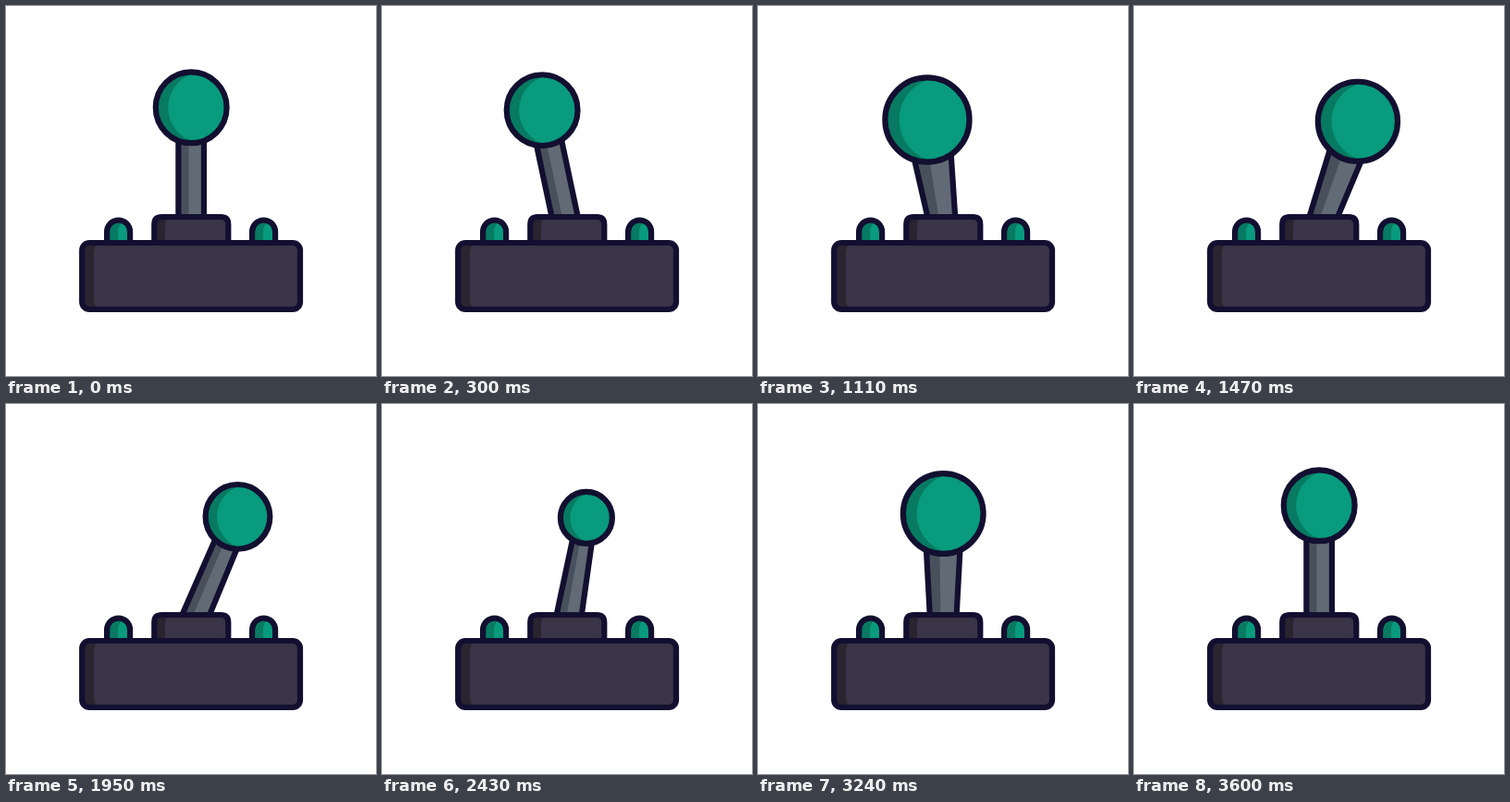
Recreate the animation shown at these times as an HTML page. Size 400x400 px, loop 5.63 s.

```html
<!DOCTYPE html>
<html lang="en">
<head>
<meta charset="utf-8">
<title>Joystick</title>
<style>
  html, body { margin: 0; width: 100%; height: 100%; overflow: hidden; background: #fff; }
  svg { display: block; width: 100%; height: 100%; }
  .line { fill: none; stroke: #120f30; stroke-width: 6.2; stroke-linejoin: round; stroke-linecap: round; }
  .green { fill: #089b7d; }
  .pine { fill: #087a62; }
  .plum { fill: #3a3447; }
  .shade { fill: #29242f; }
  .steel { fill: #626b75; }
  .slate { fill: #48515b; }
</style>
</head>
<body>
<svg viewBox="0 0 400 400">
  <defs>
    <clipPath id="round"><circle id="mask" r="38.5"/></clipPath>
    <g id="button">
      <path class="pine" d="M-12.5 256V244a12.5 12.5 0 0 1 25 0V256Z"/>
      <path class="green" d="M-.5 256V244Q-.5 237 5 233Q12.5 236 12.5 244V256Z"/>
      <path class="line" d="M-12.5 256V244a12.5 12.5 0 0 1 25 0V256"/>
    </g>
  </defs>

  <path id="rod" class="slate"/>
  <path id="shine" class="steel"/>
  <path id="edges" class="line"/>

  <g id="ball">
    <circle id="dark" class="pine"/>
    <g clip-path="url(#round)"><circle id="light" class="green"/></g>
    <circle id="rim" class="line"/>
  </g>

  <path class="shade" d="M160.3 256V236q0-8 8-8h64q8 0 8 8v20Z"/>
  <path class="plum" d="M172 256V237q0-7 5-9h55q8 0 8 8v20Z"/>
  <path class="line" d="M160.3 256V236q0-8 8-8h64q8 0 8 8v20"/>

  <use href="#button" x="121.6"/>
  <use href="#button" x="278.6"/>

  <rect class="shade" x="82.2" y="256" width="235.8" height="72" rx="8"/>
  <path class="plum" d="M101 256H310q8 0 8 8V320q0 8-8 8H101q-6-3-6-11V267q0-8.500-6 -11Z" visibility="hidden"/>
  <path class="plum" d="M101 256H310q8 0 8 8V320q0 8-8 8H101q-6-3-6-11V267q0-8 6-11Z"/>
  <rect class="line" x="82.2" y="256" width="235.8" height="72" rx="8"/>
</svg>
<script>
const LOOP = 5630, STEP = 30;
const PIVOT = { x: 200.2, y: 240 }, LENGTH = 130.2, TILT = 24 * Math.PI / 180;
const $ = id => document.getElementById(id);
const set = (id, attrs) => { for (const k in attrs) $(id).setAttribute(k, attrs[k]); };
const ease = p => (1 - Math.cos(Math.PI * Math.min(1, Math.max(0, p)))) / 2;
const ramp = (t, a, b) => ease((t - a) / (b - a));

// Heading of the lean: 180 left, 270 front, 360 right, 450 back
const TURN = [[600, 180], [1110, 251], [1470, 322], [1770, 360], [2430, 427], [2550, 450]];

function heading(t) {
  const n = TURN.length - 1;
  const rate = i => (TURN[i + 1][1] - TURN[i][1]) / (TURN[i + 1][0] - TURN[i][0]);
  const slope = i => {
    if (i === 0 || i === n) return 0;
    const a = rate(i - 1), b = rate(i);
    return 2 * a * b / (a + b);
  };
  if (t <= TURN[0][0]) return TURN[0][1];
  if (t >= TURN[n][0]) return TURN[n][1];
  let i = 0;
  while (t > TURN[i + 1][0]) i++;
  const [t0, v0] = TURN[i], [t1, v1] = TURN[i + 1], h = t1 - t0, p = (t - t0) / h;
  const q = 1 - p;
  return v0 * (1 + 2 * p) * q * q + v1 * p * p * (3 - 2 * p)
    + h * p * q * (q * slope(i) - p * slope(i + 1));
}

// Ball centre and depth: 1 is full front, -1 full back
function pose(t) {
  if (t < 600) {
    const a = TILT * ramp(t, 0, 600);
    return { x: PIVOT.x - LENGTH * Math.sin(a), y: PIVOT.y - LENGTH * Math.cos(a), z: 0 };
  }
  if (t < 2550) {
    const a = heading(t) * Math.PI / 180, c = Math.cos(a), z = -Math.sin(a);
    const dip = Math.max(0, z * c) * 5;
    return { x: PIVOT.x + LENGTH * Math.sin(TILT) * c, y: 121.3 + 1.8 * Math.abs(z) + dip, z };
  }
  const z = t < 2775 ? ramp(t, 2550, 2775) - 1
    : t < 3000 ? ramp(t, 2775, 3000)
    : 1 - ramp(t, 3000, 3600);
  return { x: PIVOT.x, y: 109.8 + 13.4 * Math.abs(z), z };
}

function draw(t) {
  const { x, y, z } = pose(t);
  const r = 38.4 + z * (z > 0 ? 7.6 : 11.3);
  const top = 13.8 + z * (z > 0 ? 10 : 4.5), foot = 13.8;
  const dx = x - PIVOT.x, dy = y - PIVOT.y, len = Math.hypot(dx, dy);
  const nx = -dy / len, ny = dx / len;
  const at = (p, w) => (p.x + nx * w).toFixed(2) + ' ' + (p.y + ny * w).toFixed(2);
  const tip = { x, y };
  const strip = k => `M${at(PIVOT, foot * k)}L${at(tip, top * k)}L${at(tip, top)}L${at(PIVOT, foot)}Z`;
  set('rod', { d: strip(-1) });
  set('shine', { d: strip(-.2) });
  set('edges', { d: `M${at(PIVOT, -foot)}L${at(tip, -top)}M${at(PIVOT, foot)}L${at(tip, top)}` });
  set('ball', { transform: `translate(${x.toFixed(2)} ${y.toFixed(2)})` });
  for (const id of ['mask', 'dark', 'rim']) set(id, { r });
  set('light', { r, cx: 3 + r * .27 });
}

const start = performance.now();
function tick() {
  const t = (performance.now() - start) % LOOP;
  draw(Math.min(3600, Math.floor(t / STEP) * STEP));
  requestAnimationFrame(tick);
}
tick();
</script>
</body>
</html>
```
